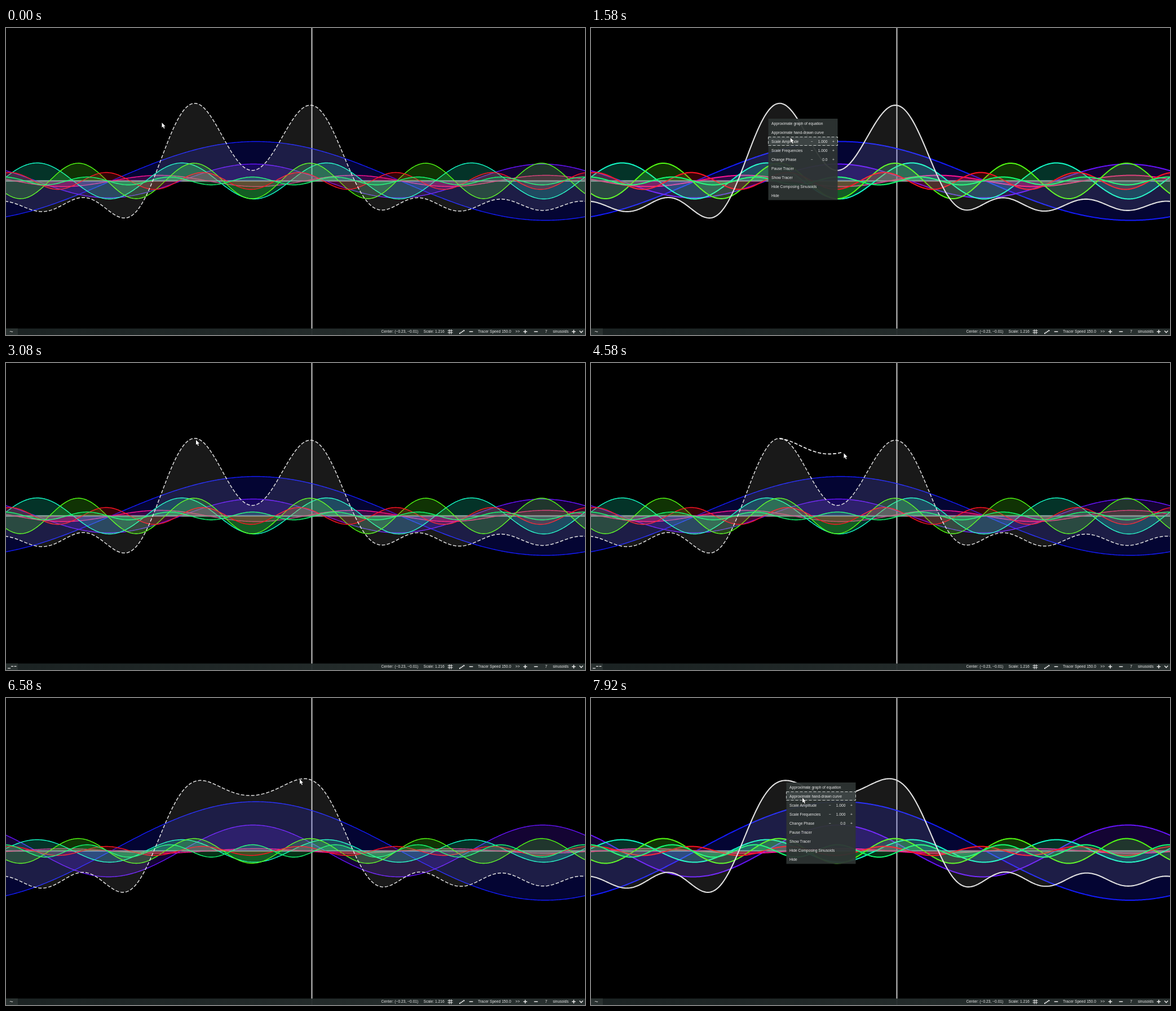
Animation, 1027 px wide and 545 px high, one loop 8 s. Source, as an HTML page with a canvas:

```html
<!DOCTYPE html>
<html lang="en">
<head>
<meta charset="utf-8">
<title>Sinusoid composer</title>
<style>
  html, body { margin: 0; width: 100%; height: 100%; overflow: hidden; background: #000; }
  canvas { display: block; }
</style>
</head>
<body>
<canvas id="stage" width="1027" height="545"></canvas>
<script>
const ctx = document.getElementById('stage').getContext('2d');
const W = 1027, H = 545, AXIS_X = 542.5, AXIS_Y = 271.5, BAR_Y = 533.5;
const LOOP = 8000, STEP = 1000 / 12, INK = '#e8e8e8';

// Harmonics 1 to 7; the amplitude at the centre is negative for a trough.
const WAVES = [
  { hue: 238, centre: 443, before: 70, after: 87.5 },
  { hue: 261, centre: 438.5, before: 30, after: 46 },
  { hue: 327, centre: 444, before: -10, after: 4 },
  { hue: 166, centre: 440.4, before: -32, after: -20 },
  { hue: 104, centre: 436.4, before: -31.5, after: -22 },
  { hue: 356, centre: 434.5, before: -15, after: -8 },
  { hue: 144, centre: 437.3, before: 7, after: 11 }
];

const STROKE = { from: 3400, to: 5583, x: 337, y: 136.5, width: 198, dip: 27 };
const REFIT = 5830;
const MOVES = [
  { from: 80, to: 583, x: 315, y: 161 },
  { from: 1000, to: 1250, x: 355, y: 203 },
  { from: 1500, to: 1750, x: 351, y: 178 },
  { from: 2000, to: 2800, x: STROKE.x, y: STROKE.y },
  { from: REFIT, to: 6500, x: 521, y: 144 },
  { from: 6700, to: 7417, x: 346.5, y: 150 },
  { from: 7500, to: 7750, x: 375, y: 177 }
];
const MENUS = [{ from: 1000, to: 2000, x: 314.5, y: 161 }, { from: 7417, to: LOOP, x: 346.5, y: 150 }];
const ROWS = [
  ['Approximate graph of equation'], ['Approximate hand-drawn curve'], ['Scale Amplitude', '1.000'],
  ['Scale Frequencies', '1.000'], ['Change Phase', '0.0'], ['Pause Tracer'], ['Show Tracer'],
  ['Hide Composing Sinusoids'], ['Hide']
];
const ARROW = new Path2D('M0 0V8.8L2 7.1 3.6 10.6 5 10 3.5 6.6 6.2 6.4Z');

const within = (t, from, to) => t >= from - 1 && t < to - 1;
const progress = (t, { from, to }) => Math.min(1, Math.max(0, (t - from) / (to - from)));
const smooth = p => p * p * (3 - 2 * p);

function strokePoint(u) {
  const dip = Math.sin(Math.PI * u ** 0.85) ** 2;
  return [STROKE.x + STROKE.width * u, STROKE.y + STROKE.dip * dip];
}

function pointerAt(t) {
  if (within(t, STROKE.from, REFIT)) return strokePoint(smooth(progress(t, STROKE)));
  let [x, y] = t < REFIT ? [276.5, 168] : strokePoint(1);
  for (const move of MOVES) {
    if (t >= REFIT && move.from < REFIT) continue;
    const p = progress(t, move);
    x += (move.x - x) * p;
    y += (move.y - y) * p;
  }
  return [x, y];
}

function text(str, x, y, align = 'left', size = 6.7) {
  ctx.font = `${size}px "Liberation Sans", Arial, sans-serif`;
  ctx.textAlign = align;
  ctx.fillStyle = INK;
  ctx.fillText(str, x, y);
}

function polyline(points, color, width, dash = []) {
  ctx.beginPath();
  points.forEach(([x, y]) => ctx.lineTo(x, y));
  ctx.strokeStyle = color;
  ctx.lineWidth = width;
  ctx.setLineDash(dash);
  ctx.stroke();
  ctx.setLineDash([]);
}

const hLine = (x, y, length, width) => polyline([[x, y], [x + length, y]], INK, width);
const vLine = (x, y, length, width) => polyline([[x, y], [x, y + length]], INK, width);

function drawWave(height, color, alpha, width, dash) {
  const points = [];
  for (let x = -2; x <= W + 2; x += 2) points.push([x, AXIS_Y - height(x)]);
  ctx.beginPath();
  [[-2, AXIS_Y], ...points, [W + 2, AXIS_Y]].forEach(([x, y]) => ctx.lineTo(x, y));
  ctx.globalAlpha = alpha;
  ctx.fillStyle = color;
  ctx.fill();
  ctx.globalAlpha = 1;
  polyline(points, color, width, dash);
}

function drawGraph(t) {
  ctx.fillStyle = '#aaa';
  ctx.fillRect(0, AXIS_Y - 1.2, W, 2.4);
  ctx.fillStyle = '#c8c8c8';
  ctx.fillRect(AXIS_X - 1, 0, 2, H);

  const solid = within(t, 490, 2000) || t >= 6740;
  const heights = WAVES.map(({ centre, before, after }, i) => {
    const amplitude = t < REFIT ? before : after;
    return x => amplitude * Math.cos(2 * Math.PI * (i + 1) * (x - centre) / W);
  });
  heights.forEach((height, i) =>
    drawWave(height, `hsl(${WAVES[i].hue},100%,54%)`, 0.2, solid ? 2 : 1.4));
  const sum = x => heights.reduce((total, height) => total + height(x), 0);
  drawWave(sum, '#e2e2e2', 0.11, solid ? 2.1 : 1.5, solid ? [] : [6, 3]);
}

function drawStroke(t) {
  if (!within(t, STROKE.from, REFIT)) return;
  const end = smooth(progress(t, STROKE)), points = [];
  for (let i = 0; i <= 60; i++) {
    const [x, y] = strokePoint(end * i / 60);
    points.push([x - 2, y - 2]);
  }
  polyline(points, INK, 1.8, [6, 3]);
}

function drawMenu({ x, y }, pointerY) {
  const pitch = 16.05, width = 123;
  const active = Math.floor((pointerY - y) / pitch);
  ctx.fillStyle = 'rgba(46,53,51,.94)';
  ctx.fillRect(x, y, width, pitch * ROWS.length);
  ROWS.forEach(([label, value], i) => {
    const top = y + i * pitch, base = top + 10.6;
    if (i === active) {
      ctx.fillStyle = '#3c4343';
      ctx.fillRect(x, top, width, pitch);
      const left = Math.round(x) - 0.5, edge = Math.round(top) + 0.5;
      polyline([[left, edge], [left + width, edge], [left + width, edge + 15], [left, edge + 15], [left, edge]],
        '#c4c8c6', 1, [5, 3]);
    }
    text(label, x + 5.5, base);
    if (value) {
      text('−', x + 77.5, base, 'center');
      text(value, x + 105, base, 'right');
      text('+', x + 115.5, base, 'center');
    }
  });
}

function drawBar(t) {
  const shade = ctx.createLinearGradient(0, 0, W, 0);
  shade.addColorStop(0, 'rgba(28,36,36,.96)');
  shade.addColorStop(1, 'rgba(42,50,49,.96)');
  ctx.fillStyle = shade;
  ctx.fillRect(0, BAR_Y, W, H - BAR_Y);
  ctx.fillStyle = '#2a3231';
  ctx.fillRect(0, BAR_Y, 21, H - BAR_Y);

  if (within(t, 2000, REFIT)) {
    hLine(3, 542, 5, 1.2);
    hLine(9, 538.5, 4, 1.2);
    hLine(14.5, 538.5, 4, 1.2);
  } else {
    text('~', 9.5, 542.5, 'center', 11);
  }

  const base = 541.4;
  text('Center: (−0.23, −0.01)', 665.5, base);
  text('Scale: 1.216', 740.5, base);
  text('Tracer Speed 150.0', 837, base);
  text('>>', 907.5, base, 'center');
  text('7', 958, base, 'center');
  text('sinusoids', 970, base);

  for (const offset of [-1.7, 1.7]) {
    vLine(788 + offset, 535, 8.5, 1);
    hLine(783.5, 539 + offset, 9, 1);
  }
  ctx.fillStyle = INK;
  for (let i = 0; i < 4; i++) {
    ctx.beginPath();
    ctx.arc(805 + 2.4 * i, 542 - 1.6 * i, 1.2, 0, 7);
    ctx.fill();
  }
  for (const x of [825, 921, 940, 1007]) hLine(x - 3.3, 539, 6.6, 1.5);
  for (const x of [921, 1007]) vLine(x, 535.7, 6.6, 1.5);
  polyline([[1017.3, 537.5], [1020.3, 540.7], [1023.3, 537.5]], INK, 1.5);
}

function drawPointer([x, y]) {
  ctx.save();
  ctx.translate(x, y);
  ctx.strokeStyle = '#000';
  ctx.lineWidth = 1;
  ctx.stroke(ARROW);
  ctx.fillStyle = '#fff';
  ctx.fill(ARROW);
  ctx.restore();
}

function render(elapsed) {
  const t = Math.floor((elapsed % LOOP + 4) / STEP) * STEP % LOOP;
  const pointer = pointerAt(t);
  ctx.fillStyle = '#000';
  ctx.fillRect(0, 0, W, H);
  drawGraph(t);
  drawStroke(t);
  drawBar(t);
  const menu = MENUS.find(({ from, to }) => within(t, from, to + 1));
  if (menu) drawMenu(menu, pointer[1]);
  drawPointer(pointer);
}

const start = performance.now();
function tick() {
  render(performance.now() - start);
  requestAnimationFrame(tick);
}
tick();
</script>
</body>
</html>
```
